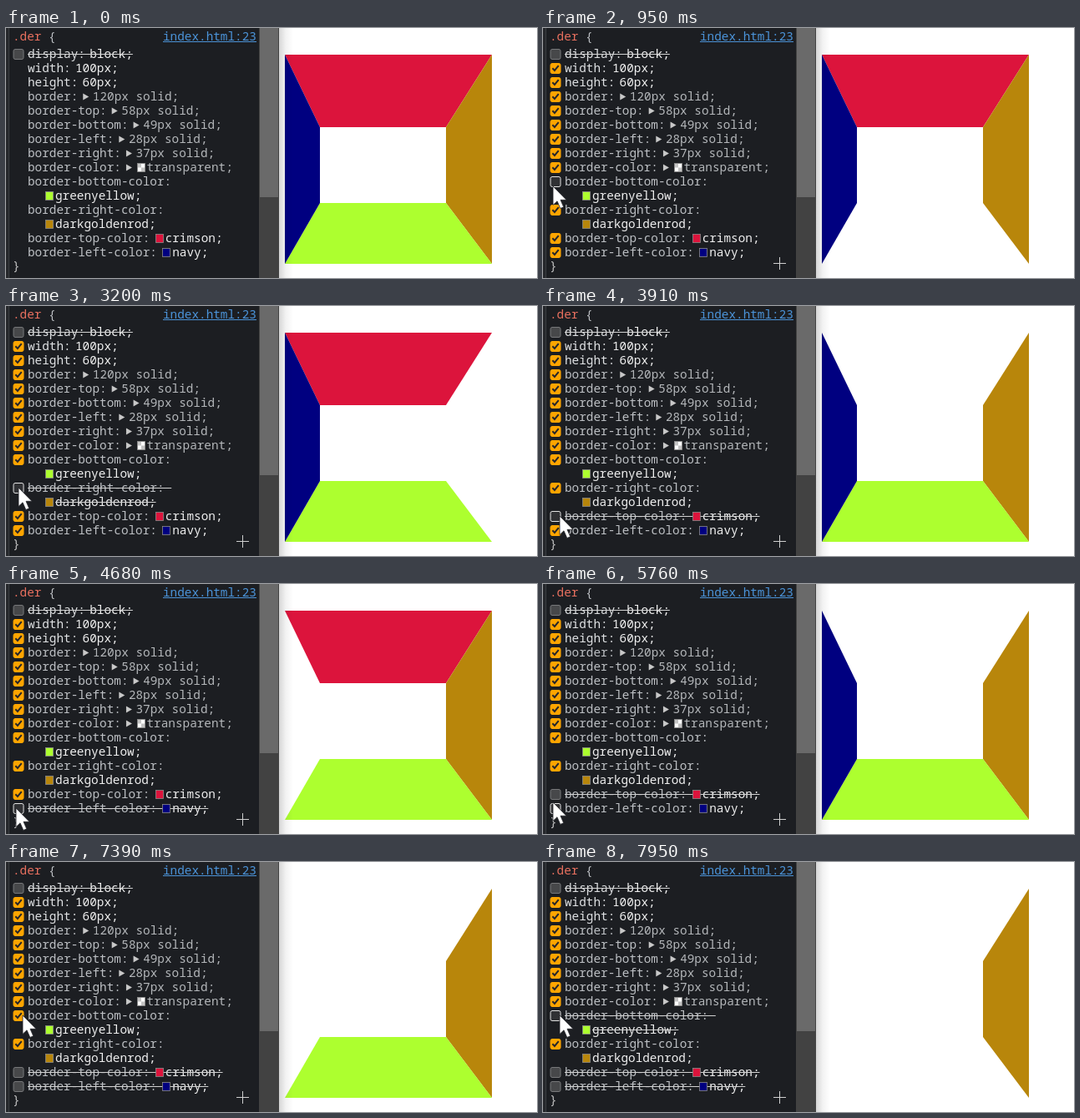
An HTML page for the animation above (8 s loop, 636x300 px).

```html
<!DOCTYPE html>
<html lang="en">
<head>
<meta charset="utf-8">
<title>Border inspector</title>
<style>
  html, body { margin: 0; width: 100%; height: 100%; overflow: hidden; background: #fff; }
  svg { display: block; width: 636px; height: 300px; }
  text { font: 14.35px "Noto Sans Mono", "DejaVu Sans Mono", monospace; white-space: pre; }
</style>
</head>
<body>
<svg id="stage" viewBox="0 0 636 300">
  <defs>
    <linearGradient id="shade">
      <stop offset="0" stop-opacity=".18"/>
      <stop offset=".5" stop-opacity=".05"/>
      <stop offset="1" stop-opacity="0"/>
    </linearGradient>
  </defs>
  <g id="sides"></g>
  <rect x="326" width="18" height="300" fill="url(#shade)"/>
  <rect width="304" height="300" fill="#1c1e22"/>
  <rect width="3" height="300" fill="#25272b"/>
  <rect x="3" width="1" height="300" fill="#3b3e43"/>
  <rect x="303" width="24" height="300" fill="#424242"/>
  <rect x="304" width="22" height="203" fill="#6a6a6a"/>
  <g id="rows"></g>
  <path id="plus" d="M276 282.5H291M283.5 275V290" stroke="#d0d0d0" fill="none"/>
  <path id="cursor" d="M0 0V22.5L5 17.8L8.8 26.5L12.7 24.8L9 16.3H16Z" fill="#fff" stroke="#24252a" stroke-width=".8"/>
</svg>
<script>
const LOOP = 8000;
const STEP = 78;
const CHAR = 8.61;
const LEFT = 26;
const LINE = 17;
const COLORS = { greenyellow: '#adff2f', darkgoldenrod: '#b8860b', crimson: '#dc143c', navy: '#000080', transparent: '#fff' };
const $ = id => document.getElementById(id);

function add(parent, tag, attrs, text) {
  const el = document.createElementNS('http://www.w3.org/2000/svg', tag);
  for (const key in attrs) el.setAttribute(key, attrs[key]);
  if (text) el.textContent = text;
  return parent.appendChild(el);
}
const show = (el, on) => el.setAttribute('visibility', on ? 'visible' : 'hidden');

const layer = $('rows');
const write = (x, y, text, fill) => add(layer, 'text', { x, y: y + 5, fill }, text);
const line = (d, stroke) => add(layer, 'path', { d, stroke, 'stroke-width': 1.2, fill: 'none' });

function swatch(x, y, fill) {
  add(layer, 'rect', { x: x + .5, y: y - 4.5, width: 9, height: 10, fill, stroke: '#8b8b8b', 'stroke-width': .8 });
  if (fill === COLORS.transparent) add(layer, 'path', { d: `M${x + 1} ${y - 4}h4v9h4v-4.5h-8z`, fill: '#c4c4c4' });
}

// The four mitred sides between the outer and the inner rectangle.
const corners = (l, t, r, b) => [[l, t], [r, t], [r, b], [l, b]];
const outer = corners(334, 32, 582, 283);
const inner = corners(376, 119, 527, 210);
const sides = {};
Object.entries({ top: 'crimson', right: 'darkgoldenrod', bottom: 'greenyellow', left: 'navy' }).forEach(([side, color], i) => {
  const next = (i + 1) % 4;
  const points = [outer[i], outer[next], inner[next], inner[i]].join(' ');
  sides[side] = add($('sides'), 'polygon', { points, fill: COLORS[color] });
});

const declarations = `display: block
width: 100px
height: 60px
border: 120px solid
border-top: 58px solid
border-bottom: 49px solid
border-left: 28px solid
border-right: 37px solid
border-color: transparent
border-bottom-color: greenyellow
border-right-color: darkgoldenrod
border-top-color: crimson
border-left-color: navy`.split('\n').map(text => text.split(': '));

let nextY = 31;
function makeRow([name, value]) {
  const y = nextY;
  const side = (name.match(/-(\w+)-color/) || [])[1];
  const color = COLORS[value];
  const shorthand = name.startsWith('border') && !side;
  const end = LEFT + (name.length + 1) * CHAR;
  const wrap = end + (value.length + 4) * CHAR > 300;
  const valueY = wrap ? y + LINE : y;
  nextY = valueY + LINE;

  const valueX = wrap ? 59 : end + 5.3 + (shorthand ? 12.3 : 0) + (color ? 13 : 0);
  const valueEnd = valueX + (value.length + 1) * CHAR;
  write(LEFT, y, name + ':', name.startsWith('border') ? '#bdc0c4' : '#e0e2e4');
  write(valueX, valueY, value + ';', shorthand ? '#b4b7ba' : '#f0f0f0');
  if (shorthand) add(layer, 'path', { d: `M${end + 6} ${y - 3.5}l7 4l-7 4z`, fill: '#c8c8c8' });

  const strike = line(wrap
    ? `M${LEFT} ${y + .5}H${end + CHAR}M${valueX} ${valueY + .5}H${valueEnd}`
    : `M${LEFT} ${y + .5}H${valueEnd}`, '#d2d2d2');
  if (color) swatch(Math.round(valueX - 11.8), valueY, color);

  const box = add(layer, 'rect', { x: 9, y: y - 5.5, width: 12, height: 12, rx: 2 });
  const tick = add(layer, 'path', { d: `M11.3 ${y + .3}l2.6 2.7l4.8 -5.8`, fill: 'none', stroke: '#25262a', 'stroke-width': 2 });
  return { y, side, strike, box, tick, disabled: name === 'display' };
}

write(8, 10, '.der', '#e8705f');
write(8 + 5 * CHAR, 10, '{', '#bdc0c4');
write(188, 10, 'index.html:23', '#4b93d8');
line('M188 16.5H300', '#4b93d8');
const rows = declarations.map(makeRow);
write(8, nextY - 1, '}', '#c4c4c4');

// Each click flips the box at once, then the colour, then the strike-through.
const clicks = {
  bottom: [870, 1270, 7800],
  right: [2480, 3430],
  top: [3750, 4140, 5530],
  left: [4530, 4910, 5760]
};
const isOff = (side, t) => clicks[side].filter(c => c <= t).length % 2 === 1;

// Pointer stops: departure, arrival, x, y.
const stops = [
  [70, 720, 12, 190],
  [1570, 1800, 16, 229],
  [2240, 2310, 15, 218],
  [3600, 3680, 20, 252],
  [4300, 4380, 12, 269],
  [5380, 5460, 13, 254],
  [5690, 5760, 11, 269],
  [6150, 6940, 20, 184]
];

function pointerAt(t) {
  let x = 400, y = 310;
  for (const [from, to, stopX, stopY] of stops) {
    if (t < from) break;
    const ticks = Math.floor((t - from) / STEP) + 1;
    const part = Math.min(1, ticks * STEP / (to - from + STEP));
    x += (stopX - x) * part;
    y += (stopY - y) * part;
  }
  return [x, y];
}

function paintRow({ y, side, strike, box, tick, disabled }, t, pointer, inside) {
  const off = disabled || Boolean(side) && isOff(side, t);
  const hovered = side && pointer[0] < 24 && Math.abs(pointer[1] - y) < LINE / 2;
  const [fill, stroke] = !off ? ['#ffa500', '#ffa500'] : hovered ? ['#303134', '#e2e2e2'] : ['#47484a', '#77787a'];
  box.setAttribute('fill', fill);
  box.setAttribute('stroke', stroke);
  show(box, inside || disabled);
  show(tick, inside && !off);
  show(strike, disabled || side && isOff(side, t - 2 * STEP + 6));
}

function render(t) {
  const pointer = pointerAt(t);
  const inside = pointer[0] < 303;
  for (const row of rows) paintRow(row, t, pointer, inside);
  for (const side in sides) show(sides[side], !isOff(side, t - STEP));
  show($('plus'), inside);
  $('cursor').setAttribute('transform', `translate(${pointer})`);
}

const begin = performance.now();
function frame() {
  render((performance.now() - begin) % LOOP);
  requestAnimationFrame(frame);
}
render(0);
requestAnimationFrame(frame);
</script>
</body>
</html>
```
